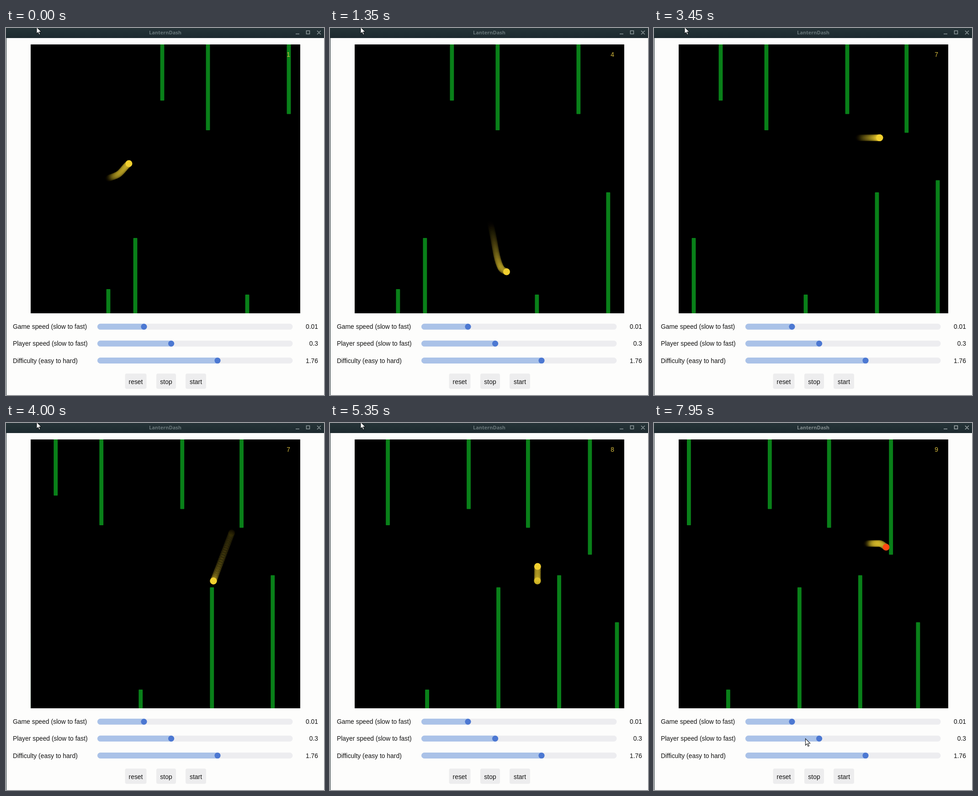
Write an HTML page with a canvas that moves like this. It is 696x804 px and loops after 8000 ms.

```html
<!DOCTYPE html>
<html lang="en">
<head>
<meta charset="utf-8">
<title>LanternDash</title>
<style>
html, body { margin: 0; width: 100%; height: 100%; overflow: hidden; background: #fdfdfc; }
canvas { display: block; }
</style>
</head>
<body>
<canvas id="stage" width="696" height="804"></canvas>
<script>
const ctx = document.getElementById('stage').getContext('2d');
const LOOP = 8000, STEP = 50;
const CRASH = 6270, FOCUS = 7300;
const TRAIL = { span: 600, samples: 40, alpha: 0.22 };
const FIELD = { x: 54, y: 36, w: 590, h: 589 };
const SANS = '13.9px "Liberation Sans", Arial, sans-serif';
const INK = '#121212';

// Smooth, monotone curve through keys of the form [ms, value, ...]
function curve(keys) {
  const last = keys.length - 1;
  const secant = (i, k) => (keys[i + 1][k] - keys[i][k]) / (keys[i + 1][0] - keys[i][0]);
  const slope = (i, k) => {
    if (i === 0) return secant(0, k);
    if (i === last) return secant(last - 1, k);
    const a = secant(i - 1, k), b = secant(i, k);
    return a * b > 0 ? 2 * a * b / (a + b) : 0;
  };
  return time => {
    const t = Math.min(keys[last][0], Math.max(keys[0][0], time));
    let i = 0;
    while (i < last - 1 && keys[i + 1][0] < t) i++;
    const span = keys[i + 1][0] - keys[i][0], u = (t - keys[i][0]) / span;
    return keys[i].slice(1).map((p, n) => {
      const k = n + 1, q = keys[i + 1][k];
      const ease = u * u * (3 - 2 * u);
      return p + (q - p) * ease
        + span * u * (1 - u) * (slope(i, k) * (1 - u) - slope(i + 1, k) * u);
    });
  };
}

const scroll = curve([[0, 0], [3450, 196], [4500, 266.8], [6150, 359], [CRASH, 365.6]]);
const player = curve([
  [-600, 222, 330], [-300, 245, 321], [0, 269, 297], [300, 300, 278],
  [750, 350, 425], [1270, 375, 527], [1350, 386.5, 534],
  [1750, 370, 440], [2110, 369, 352], [2350, 392.5, 280],
  [2850, 445, 240.5], [3450, 494, 240.5], [3900, 454, 346],
  [5080, 454, 346], [5550, 455, 282], [5740, 468, 264], [6150, 494.5, 264], [CRASH, 508, 272]
]);
const pointer = curve([[6900, 66.5, -2.5], [7650, 488, 608], [7880, 318, 713], [7950, 331, 691]]);

// Pillars: [centre x at time 0, inner end]
const upper = [[342, 159], [442, 224], [619, 188.5], [748.8, 229.5], [884.3, 288.5]];
const lower = [[224, 572], [283, 460], [528, 584], [684, 360], [817, 333.5], [943.5, 436.5]];

function box(x, y, w, h, r, color) {
  ctx.fillStyle = color;
  ctx.beginPath();
  ctx.roundRect(x, y, w, h, r);
  ctx.fill();
}

function disc(x, y, r, color) {
  ctx.fillStyle = color;
  ctx.beginPath();
  ctx.arc(x, y, r, 0, Math.PI * 2);
  ctx.fill();
}

function text(str, x, y, color, align = 'left', font = SANS) {
  ctx.font = font;
  ctx.textAlign = align;
  ctx.fillStyle = color;
  ctx.fillText(str, x, y);
}

function titleBar(active) {
  const g = ctx.createLinearGradient(0, 0, 0, 22);
  g.addColorStop(0, '#263438');
  g.addColorStop(1, '#1d2a2f');
  ctx.fillStyle = g;
  ctx.fillRect(0, 0, 696, 22);
  ctx.fillRect(0, 22, 1, 782);
  text('LanternDash', 348.5, 14, active ? '#838d8f' : '#69777a', 'center',
    'bold 11px "Noto Sans", "Open Sans", sans-serif');
  ctx.strokeStyle = active ? '#a0a8aa' : '#8b9799';
  ctx.lineWidth = 1.6;
  ctx.beginPath();
  ctx.moveTo(634, 13); ctx.lineTo(642, 13);
  ctx.rect(657.5, 6, 7, 7);
  ctx.moveTo(681, 6); ctx.lineTo(689, 14);
  ctx.moveTo(689, 6); ctx.lineTo(681, 14);
  ctx.stroke();
}

function trail(now) {
  for (let i = 0; i < TRAIL.samples; i++) {
    const age = 1 - i / TRAIL.samples;
    const [x, y] = player(now - TRAIL.span * age);
    ctx.globalAlpha = TRAIL.alpha * (1 - age);
    disc(x, y, 7.5, '#efd032');
  }
  ctx.globalAlpha = 1;
}

function field(t) {
  const now = Math.min(t, CRASH);
  const [shift] = scroll(now);
  const [px, py] = player(now);
  const bottom = FIELD.y + FIELD.h;
  const pillar = (x, top, end) => box(x - shift - 4.4, top, 8.8, end - top, 1, '#098019');

  ctx.save();
  ctx.beginPath();
  ctx.rect(FIELD.x, FIELD.y, FIELD.w, FIELD.h);
  ctx.clip();
  ctx.fillStyle = '#000';
  ctx.fillRect(FIELD.x, FIELD.y, FIELD.w, FIELD.h);

  for (const [x, end] of upper) pillar(x, FIELD.y - 5, end);
  for (const [x, end] of lower) pillar(x, end, bottom + 5);
  trail(now);
  disc(px, py, 7.5, t >= CRASH ? '#ff4811' : '#f2d02f');

  // Score: pillars left behind by the player
  const score = [...upper, ...lower].filter(([x]) => x - shift < px + 1).length;
  text(score, 618, 62.5, '#d2b83c', 'center');
  ctx.restore();
}

function slider(label, value, y, knob) {
  text(label, 15, y + 5, INK);
  box(200, y - 6.5, 427.5, 13, 6.5, '#ededf0');
  box(200, y - 6.5, knob - 200, 13, [6.5, 0, 0, 6.5], '#aac2e8');
  disc(knob, y, 6.6, '#4c78d2');
  text(value, 683, y + 5, INK, 'right');
}

function button(label, x, w) {
  box(x, 757, w, 33.5, 4, '#ededee');
  text(label, x + w / 2, 779.5, INK, 'center');
}

function cursor(t) {
  const [x, y] = pointer(t);
  const shape = [[0, 0], [0, 14.5], [3.3, 11.4], [5.7, 16.8], [8, 15.8], [5.6, 10.5], [10.2, 10.3]];
  ctx.beginPath();
  shape.forEach(([dx, dy]) => ctx.lineTo(x + dx + 0.5, y + dy + 0.5));
  ctx.closePath();
  ctx.fillStyle = '#fff';
  ctx.fill();
  ctx.strokeStyle = '#15191c';
  ctx.lineWidth = 1.1;
  ctx.stroke();
}

function draw(t) {
  ctx.fillStyle = '#fdfdfc';
  ctx.fillRect(0, 0, 696, 804);
  titleBar(t >= FOCUS);
  field(t);
  slider('Game speed (slow to fast)', '0.01', 654.3, 302);
  slider('Player speed (slow to fast)', '0.3', 691.3, 361.6);
  slider('Difficulty (easy to hard)', '1.76', 728.5, 463);
  button('reset', 260.5, 47);
  button('stop', 329, 43);
  button('start', 393, 45);
  cursor(t);
}

const start = performance.now();
function tick() {
  const t = (performance.now() - start) % LOOP;
  draw(Math.floor(t / STEP) * STEP);
  requestAnimationFrame(tick);
}
tick();
</script>
</body>
</html>
```
